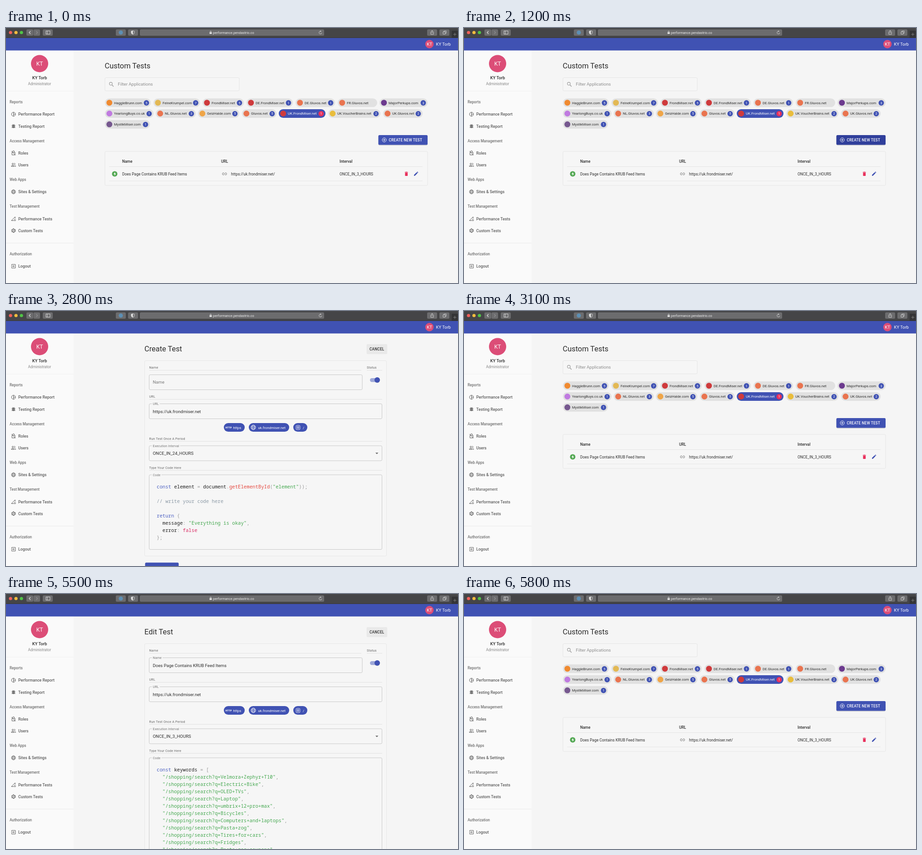
An HTML page for the animation above (7 s loop, 996 by 562 pixels).

```html
<!DOCTYPE html>
<html lang="en">
<head>
<meta charset="utf-8">
<title>Custom tests</title>
<style>
html, body { margin: 0; width: 100%; height: 100%; overflow: hidden; background: #f5f5f5; }
svg { display: block; width: 996px; height: 562px; font-family: Roboto, Arial, sans-serif; }
.mono { font-family: "Noto Sans Mono", "DejaVu Sans Mono", monospace; white-space: pre; }
</style>
</head>
<body>
<svg id="stage" viewBox="0 0 996 562"></svg>
<script>
const BLUE = '#4052b3', PINK = '#dc4d77', CARD = '#f6f6f6', INK = '#2c2c2c', GREY = '#5c5c5c', LINE = '#e1e1e1';

const attrs = o => Object.entries(o).map(([k, v]) => ` ${k}="${v}"`).join('');
const text = (x, y, s, size, fill = INK, o = {}) =>
  `<text x="${x}" y="${y}" font-size="${size}" fill="${fill}"${attrs(o)}>${s}</text>`;
const rect = (x, y, x2, y2, fill, r = 0, o = {}) =>
  `<rect x="${x}" y="${y}" width="${x2 - x}" height="${y2 - y}" rx="${r}" fill="${fill}"${attrs(o)}/>`;
const frame = (x, y, x2, y2, stroke, fill = 'none') => rect(x, y, x2, y2, fill, 2.5, { stroke, 'stroke-width': .8 });
const dot = (x, y, r, fill, o = {}) => `<circle cx="${x}" cy="${y}" r="${r}" fill="${fill}"${attrs(o)}/>`;
const path = (d, stroke, w = 1, fill = 'none') =>
  `<path d="${d}" stroke="${stroke}" stroke-width="${w}" fill="${fill}" stroke-linejoin="round"/>`;
const rule = (x, x2, y, c = LINE) => path(`M${x} ${y}H${x2}`, c, .8);
const at = (x, y, s) => `<g transform="translate(${x} ${y})">${s}</g>`;
const mid = { 'text-anchor': 'middle' }, medium = { 'font-weight': 500 };
const caps = { 'font-weight': 500, 'letter-spacing': .23 };

const globe = (c, r) => dot(0, 0, r, 'none', { stroke: c }) +
  `<ellipse rx="${r * .45}" ry="${r}" fill="none" stroke="${c}" stroke-width=".8"/>` +
  path(`M${-r * .9} -1.6H${r * .9}M${-r * .9} 1.6H${r * .9}`, c, .8);
const gear = (c, r) => dot(0, 0, r, 'none', { stroke: c, 'stroke-width': r * .35, 'stroke-dasharray': `${r * .7} ${r * .347}` }) +
  dot(0, 0, r * .75, 'none', { stroke: c, 'stroke-width': r * .25 }) + dot(0, 0, r * .28, c);
const icons = {
  pie: dot(0, 0, 4.4, 'none', { stroke: GREY }) + path('M0-4.4V4.4M0 0H4.4', GREY),
  bug: rect(-2.3, -3.6, 2.3, 4, GREY, 2.3) + path('M-4-2H4M-4 .5H4M-4 3H4M-2-4.5L-1-3M2-4.5L1-3', GREY) +
    path('M-1-.8H1M-1 1.4H1', '#fafafa', .7),
  lock: path('M-3.4-1.5H3.4V4.3H-3.4ZM-2-1.5V-3A2 2 0 0 1 2-3V-1.5M-4.5-4.2L4.3 4.8', GREY),
  users: dot(-1.5, -1.8, 1.7, 'none', { stroke: GREY }) + path('M-4.7 3.6V2.6Q-1.5 .2 1.7 2.6V3.6ZM1.6-3.6A1.8 1.8 0 0 1 1.6 0M3 1.2Q4.8 2 4.8 3.6H3', GREY),
  globe: globe(GREY, 4.4),
  chart: path('M3.6-.5V-4.4L-4.6 4H.5', GREY) + at(3, 3, gear(GREY, 1.9)),
  gear: gear(GREY, 4),
  exit: path('M-4-1.7V-4H4.2V4H-4V1.7M-5 0H1.5M-.5-2.2L1.7 0L-.5 2.2', GREY)
};

function browserBar() {
  const key = '#6c6c6e', pale = '#e2e2e2';
  const keys = [[45, 60], [60.6, 75], [81, 103], [242, 264], [269, 291], [295, 701], [928, 950], [955, 977]];
  return rect(0, 0, 996, 22, '#454547') + rect(0, 20.8, 996, 22, '#39393b') +
    ['#f2605a', '#f3bd3d', '#50c446'].map((c, i) => dot(10 + 12 * i, 10, 3.6, c)).join('') +
    keys.map(([a, b]) => rect(a, 3, b, 17, key, 2.5)).join('') +
    path('M54 7L51 10L54 13', pale, 1.2) + path('M66.500 7L69.500 10L66.500 13', '#909092', 1.1) +
    path('M88 6.500H97V13.500H88ZM91 6.500V13.500', pale, .9) +
    dot(253, 10, 4.6, '#5d8fb4') +
    path('M279.500 6L283 7V10Q283 13 279.500 14Q276 13 276 10V7Z', pale, .8) + path('M279.500 6V14Q276 13 276 10V7Z', pale, .3, pale) +
    rect(448.500, 9.200, 453.500, 13, pale, .6) + path('M449.700 9V8A1.300 1.300 0 0 1 452.300 8V9', pale, .8) +
    text(456, 13, 'performance.pendastrio.co', 7.5, '#f0f0f0') +
    path('M695.800 10.500A3 3 0 1 1 694 7.300M692.500 5.500L694.500 7.400L692.300 8.600', pale, .8) +
    path('M937.500 8.500H936V14H942V8.500H940.500M939 11V5.500M937.300 7L939 5.300L940.700 7', pale, .8) +
    path('M963 8.500H968V13.500H963ZM965 8.500V6.500H970V11.500H968', pale, .8) +
    rect(982, 6, 996, 22, '#343436') + path('M985.500 14H992.500M989 10.500V17.500', '#929294', .8);
}

function sidebar() {
  const heads = [['Reports', 166], ['Access Management', 251.500], ['Web Apps', 337], ['Test Management', 396], ['Authorization', 501]];
  const items = [['pie', 'Performance Report', 190], ['bug', 'Testing Report', 216.500], ['lock', 'Roles', 275.500], ['users', 'Users', 301.500],
    ['globe', 'Sites &amp; Settings', 361], ['chart', 'Performance Tests', 420.500], ['gear', 'Custom Tests', 446.500], ['exit', 'Logout', 525]];
  return rect(0, 49, 149, 562, '#fafafa') + rule(0, 149, 139, '#ececec') + rule(0, 149, 474, '#e6e6e6') +
    dot(74, 78.500, 19, PINK) + text(74, 82.600, 'KT', 12, '#fff', mid) +
    text(74, 112.500, 'KY Torb', 9.400, INK, { ...mid, ...medium }) + text(74, 125.500, 'Administrator', 8.400, '#868686', mid) +
    heads.map(([s, y]) => text(8, y, s, 8.150, '#707070', medium)).join('') +
    items.map(([k, s, y]) => at(16.500, y, icons[k]) + text(27, y + 3, s, 8.800, GREY, medium)).join('');
}

const chips = [
  [[218, 319, 'HaggleBrunn.com', 5, '#f08a30'], [325, 427.500, 'FeineKrumpel.com', 7, '#e3b954'], [433, 524, 'FrondMiser.net', 5, '#cf3a3c'],
    [530, 632, 'DE.FrondMiser.net', 1, '#cf3a3c'], [638, 725, 'DE.Gluvos.net', 1, '#e9744f'], [731, 818, 'FR.Gluvos.net', 0, '#e9744f'],
    [823, 929, 'MajorPerkups.com', 3, '#6c3a8e']],
  [[218, 325, 'YearlongBuys.co.uk', 1, '#c07be0'], [330, 418, 'NL.Gluvos.net', 3, '#e9744f'], [423, 514, 'GeizHalde.com', 5, '#efa548'],
    [520, 596, 'Gluvos.net', 5, '#e9744f'], [601, 704, 'UK.FrondMiser.net', 1, '#cf3a3c'], [710, 825, 'UK.VoucherBrains.net', 2, '#e9bd3c'],
    [831, 918, 'UK.Gluvos.net', 2, '#e9744f']],
  [[218, 317, 'MystikMiser.com', 1, '#76588f']]
];

function chip([x, x2, name, count, color], y) {
  const on = name === 'UK.FrondMiser.net';
  return rect(x, y - 9.500, x2, y + 9.500, on ? BLUE : '#e1e1e1', 9.500) + dot(x + 9.800, y, 6.500, color) +
    text(x + 20, y + 2.800, name, 7.750, on ? '#fff' : INK) +
    (count ? dot(x2 - 9.600, y + .3, 5.900, on ? '#e8305c' : BLUE) + text(x2 - 9.600, y + 2.900, count, 7.200, '#fff', mid) : '');
}

function listPage() {
  return text(217.500, 88.500, 'Custom Tests', 16.400) + frame(218, 109.500, 514, 138.500, LINE, CARD) +
    dot(231, 122.800, 3.200, 'none', { stroke: '#999', 'stroke-width': 1.100 }) + path('M233.300 125.200L237 129', '#999', 1.300) +
    text(246.500, 126.500, 'Filter Applications', 9.600, '#8c8c8c') +
    chips.map((row, i) => row.map(c => chip(c, 164.700 + 23.800 * i)).join('')).join('') +
    rect(820.500, 237.500, 929, 259, '#0002', 3) + rect(820.500, 236, 929, 257.500, BLUE, 2.500, { id: 'create' }) +
    dot(833.500, 246.700, 4.500, 'none', { stroke: '#fff' }) + path('M831 246.700H836M833.500 244.200V249.200', '#fff') +
    text(843.500, 249.700, 'CREATE NEW TEST', 8.150, '#fff', caps) +
    frame(218, 272, 929, 347, LINE, CARD) + rule(227, 918, 305.500) + rule(227, 918, 337) +
    [['Name', 256], ['URL', 474], ['Interval', 735]].map(([s, x]) => text(x, 296.800, s, 8.450, INK, medium)).join('') +
    dot(239.500, 321.500, 6, '#55a955') + path('M240.200 317.500L237 322.200H239.300V325.500L242.200 320.800H240.200Z', 'none', 0, '#fff') +
    text(256, 324.800, 'Does Page Contains KRUB Feed Items', 8.450) +
    path('M480.500 319.200H479A2.300 2.300 0 0 0 479 323.800H480.500M482.500 319.200H484A2.300 2.300 0 0 1 484 323.800H482.500M479.500 321.500H483.500', '#777') +
    text(496, 324.800, 'https://uk.frondmiser.net/', 8.450) + text(735, 324.800, 'ONCE_IN_3_HOURS', 8.450) +
    rect(879.300, 319, 885.100, 326, '#e8305c', .8) + rect(878.700, 317.300, 885.700, 318.500, '#e8305c') + rect(880.800, 316.600, 883.600, 317.500, '#e8305c') +
    path('M899 325.800V323.800L904.800 318L906.800 320L901 325.800ZM905.400 317.400L906.300 316.500Q907 316.300 908.300 318.300L907.400 319.400Z', 'none', 0, BLUE);
}

const field = (x2, y, y2, label, value) => frame(315.500, y, x2, y2, '#bdbdbd') +
  text(323.500, y + 2.500, label, 7.200, '#777', { 'letter-spacing': .07, stroke: CARD, 'stroke-width': 5, 'paint-order': 'stroke' }) +
  text(323.500, y + 20, value, 9.600);
const caption = (x, x2, y, s) => text(x, y, s, 7.200, '#666', { 'letter-spacing': .2 }) + rule(x, x2, y + 3.700, '#dcdcdc');

const codeColors = { k: '#4c60c2', r: '#e5483f', s: '#45a850', p: '#999', c: '#8c9aa6', f: '#d92a62', t: '#222' };
// Each line is [indent, kind, text, kind, text, ...].
const code = lines => lines.map(([indent, ...parts], i) => {
  let spans = '';
  for (let j = 0; j < parts.length; j += 2) spans += `<tspan fill="${codeColors[parts[j]]}">${parts[j + 1]}</tspan>`;
  return text(332 + indent * 6.400, 391 + 16 * i, spans, 10.670, INK, { class: 'mono' });
}).join('');

function formPage(title, nameField, interval, bottom, lines) {
  return text(305, 88.500, title, 16.400) +
    rect(794.500, 73, 840, 95, '#0000', 2.500, { class: 'cancel' }) + text(801, 87.300, 'CANCEL', 8.200, INK, caps) +
    frame(305.500, 109.500, 838.500, bottom, '#e4e4e4', CARD) +
    caption(315.500, 783, 127, 'Name') + caption(795, 829, 127, 'Status') + nameField +
    rect(802, 148, 822, 156.500, '#9ea8d8', 4.200) + dot(818, 152.700, 6, '#0002') + dot(818, 152, 6, BLUE) +
    caption(315.500, 829, 191, 'URL') + field(828.500, 204.500, 237.500, 'URL', 'https://uk.frondmiser.net') +
    [[480, 526], [535, 624], [633, 664]].map(([a, b]) => rect(a, 247, b, 266, BLUE, 9.500)).join('') +
    text(483.500, 258.700, 'HTTP', 5.400, '#fff', { 'font-weight': 700 }) + text(500.500, 259.500, 'https', 7.750, '#fff') +
    at(545, 256.500, globe('#fff', 5)) + text(555.500, 259.500, 'uk.frondmiser.net', 7.750, '#fff') +
    frame(639, 252, 648, 261.500, '#fff') + path('M641.500 254.500H645.500V257.500H641.500ZM641 260L643.500 257.500L646 260', '#fff', .9) +
    text(654, 259.500, '/', 7.750, '#fff') +
    caption(315.500, 829, 283.500, 'Run Test Once A Period') + field(828.500, 297, 330, 'Execution Interval', interval) +
    path('M814 312.200H820.500L817.200 315.500Z', 'none', 0, '#666') +
    caption(315.500, 829, 347.500, 'Type Your Code Here') + field(828.500, 361, bottom - 14.500, 'Code', '') + code(lines);
}

const createPage = () => formPage('Create Test',
  frame(315.500, 140.500, 785, 173.500, '#bdbdbd') + text(323.500, 160, 'Name', 9.600, '#777'), 'ONCE_IN_24_HOURS', 540, [
    [0, 'k', 'const', 't', ' element ', 'p', '=', 't', ' document', 'p', '.', 'r', 'getElementById', 'p', '(', 's', '"element"', 'p', '));'],
    [], [0, 'c', '// write your code here'], [],
    [0, 'k', 'return', 'p', ' {'],
    [2, 't', 'message', 'p', ': ', 's', '"Everything is okay"', 'p', ','],
    [2, 't', 'error', 'p', ': ', 'f', 'false'],
    [0, 'p', '};']
  ]) + rect(306.500, 554.500, 380.500, 580, BLUE, 2.500);

const searches = ['Velmora+Zephyr+T10', 'Electric+Bike', 'OLED+TVs', 'Laptop', 'umbrix+12+pro+max', 'Bicycles',
  'Computers+and+laptops', 'Pasta+zog', 'Tires+for+cars', 'Fridges', 'Pasta+zog+coupons'];
const editPage = () => formPage('Edit Test',
  field(785, 140.500, 173.500, 'Name', 'Does Page Contains KRUB Feed Items'), 'ONCE_IN_3_HOURS', 700, [
    [0, 'k', 'const', 't', ' keywords ', 'p', '= ['],
    ...searches.map(s => [2, 's', `"/shopping/search?q=${s}"`, 'p', ','])
  ]);

const pages = { list: listPage(), create: createPage(), edit: editPage() };
stage.innerHTML = rect(0, 0, 996, 562, '#f5f5f5') +
  Object.entries(pages).map(([k, s]) => `<g data-page="${k}">${s}</g>`).join('') + sidebar() +
  rect(0, 22, 996, 49.500, BLUE) + dot(933, 35.500, 9.300, PINK) + text(933, 39, 'KT', 9.600, '#fff', mid) +
  text(947.500, 38.700, 'KY Torb', 9.400, '#fff') + browserBar();

const groups = stage.querySelectorAll('[data-page]');
const createButton = stage.querySelector('#create'), cancels = stage.querySelectorAll('.cancel');
// [end time, page, button hovered]
const steps = [[1200, 'list'], [1600, 'list', 1], [2800, 'create'], [3100, 'create', 1],
  [4300, 'list'], [5500, 'edit'], [5800, 'edit', 1], [7000, 'list']];

function draw(now) {
  const t = now % 7000;
  const [, page, hover] = steps.find(s => t < s[0]);
  groups.forEach(g => g.style.display = g.dataset.page === page ? '' : 'none');
  createButton.style.fill = hover ? '#303f9b' : BLUE;
  cancels.forEach(c => c.style.fill = hover ? '#0000000d' : 'none');
  requestAnimationFrame(draw);
}
draw(performance.now());
</script>
</body>
</html>
```
